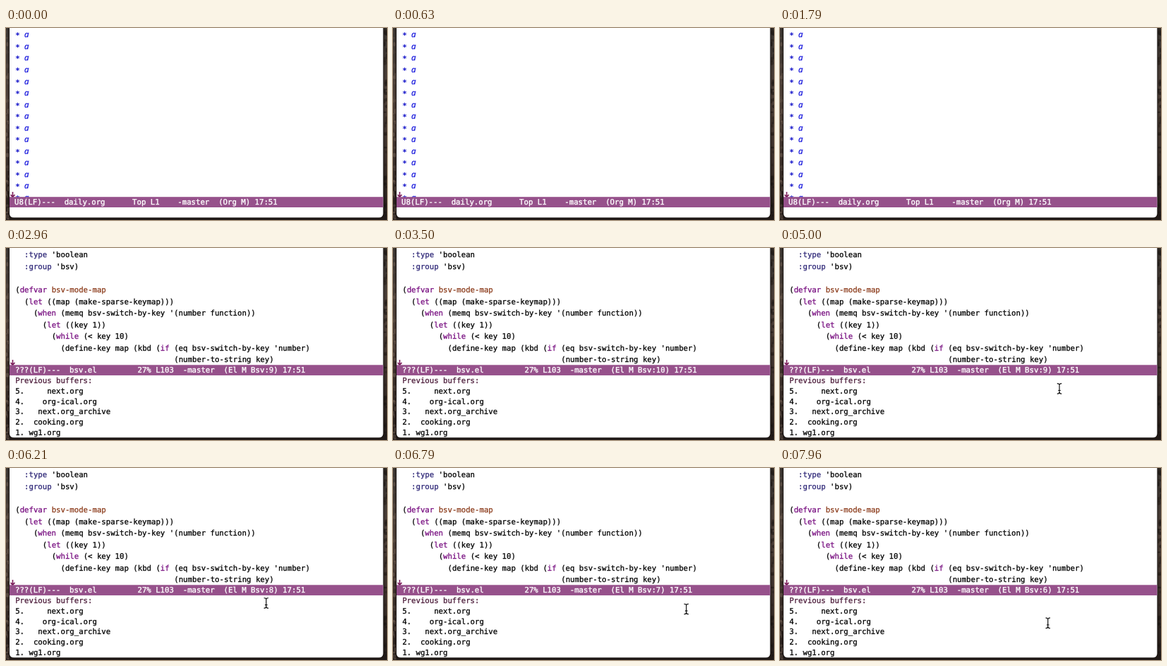
An HTML page that plays this animation: 540 px wide and 273 px high, repeating every 8 s.

```html
<!DOCTYPE html>
<html lang="en">
<head>
<meta charset="utf-8">
<title>Buffer switching</title>
<style>
  html, body { margin: 0; width: 100%; height: 100%; overflow: hidden; background: #2d2521; }
  svg { display: block; width: 540px; height: 273px; }
  text {
    font: 10.68px "DejaVu Sans Mono", monospace;
    white-space: pre;
    text-rendering: geometricPrecision;
    color: #000;
  }
  text, tspan { fill: currentColor; stroke: currentColor; stroke-width: .28px; }
  .k { color: #780f80; }
  .v { color: #8c3c1c; }
  .b { color: #2f2878; }
  .prompt { color: #4c1c3a; }
  .star { font-weight: bold; color: #1010c8; stroke: none; }
  .head { font: italic 11.4px "Open Sans", "Noto Sans", sans-serif; color: #1414dc; }
  .bar { fill: #96518b; }
  .mode { color: #fff; stroke-width: .36px; }
  .window { fill: #fff; stroke: #15100e; stroke-width: 2; paint-order: stroke; }
  .arrow { fill: none; stroke: #7a1a58; stroke-width: 1.6; }
  .beam { fill: none; stroke: #111; stroke-width: 1.2; }
</style>
</head>
<body>
<svg viewBox="0 0 540 273">
  <defs>
    <linearGradient id="soil" x2="0" y2="1">
      <stop offset="0" stop-color="#38332f"/>
      <stop offset=".35" stop-color="#4a3d35"/>
      <stop offset=".65" stop-color="#3a2e28"/>
      <stop offset="1" stop-color="#211a17"/>
    </linearGradient>
  </defs>
  <rect width="540" height="273" fill="url(#soil)"/>
  <g id="pebbles"></g>
  <path class="window" d="M5-3H534.5V263.5Q534.5 269.5 528.5 269.5H11Q5 269.5 5 263.5Z"/>
  <g id="outline"></g>
  <g id="code"></g>
  <g id="mouse">
    <path class="beam" d="M-3.2-7.3Q0-7.3 0-5V5Q0 7.3-3.2 7.3M3.2-7.3Q0-7.3 0-5V5Q0 7.3 3.2 7.3M-1.8 2.5H1.8"/>
  </g>
</svg>
<script>
const LOOP = 8000, FRAME = 1000 / 24;
const LEFT = 13.2, ADVANCE = 6.43, ROW = 16.54, TOP = 13.4;
const $ = id => document.getElementById(id);

const label = (x, y, body, cls = '') => `<text x="${x}" y="${y}" class="${cls}">${body}</text>`;
const at = (col, y, body, cls) => label(LEFT + col * ADVANCE, y, body, cls);
const arrow = y => `<path class="arrow" d="M9.5 ${y}v7M6.5 ${y + 4}l3 3.4l3-3.4"/>`;
const modeLine = (x, y, body) =>
  `<rect class="bar" x="5" y="${y}" width="529.5" height="14.8"/>` + label(x, y + 11.1, body, 'mode');
const paint = (cls, s) => `<tspan class="${cls}">${s}</tspan>`;
const key = s => paint('k', s);

function pebbles() {
  let seed = 11, out = '';
  const rnd = () => (seed = seed * 16807 % 2147483647) / 2147483647;
  const tones = ['#6b5a4e', '#1b1512', '#54463d', '#282019'];
  for (let i = 0; i < 90; i++) {
    const x = (i % 2 ? 535 : 0) + rnd() * 5;
    out += `<ellipse cx="${x}" cy="${rnd() * 273}" rx="${1 + rnd() * 2}" ry="${1 + rnd() * 3}"
      fill="${tones[i % 4]}" opacity=".6"/>`;
  }
  return out;
}

function outline() {
  let out = '';
  for (let i = 0; i < 15; i++) {
    const y = TOP + i * ROW;
    out += at(0, y + 1, '*', 'star') + label(26, y, 'a', 'head');
  }
  return out + arrow(233) +
    modeLine(12, 240.2, 'U8(LF)---  daily.org      Top L1    -master  (Org M) 17:51');
}

function code() {
  const lines = [
    [2, paint('b', ':type') + " 'boolean"],
    [2, paint('b', ':group') + " 'bsv)"],
    [0, ''],
    [0, `(${key('defvar')} ${paint('v', 'bsv-mode-map')}`],
    [2, `(${key('let')} ((map (make-sparse-keymap)))`],
    [4, `(${key('when')} (memq bsv-switch-by-key '(number function))`],
    [6, `(${key('let')} ((key 1))`],
    [8, `(${key('while')} (&lt; key 10)`],
    [10, `(define-key map (kbd (${key('if')} (eq bsv-switch-by-key 'number)`],
    [35, '(number-to-string key)']
  ];
  const buffers = ['next.org', 'org-ical.org', 'next.org_archive', 'cooking.org', 'wg1.org'];
  return lines.map(([col, body], i) => at(col, TOP + i * ROW, body)).join('') +
    arrow(159) +
    modeLine(13, 166.3, '???(LF)---  bsv.el         27% L103  -master  (El M Bsv:<tspan id="count">10</tspan>) 17:51') +
    at(0, 192, 'Previous buffers:', 'prompt') +
    buffers.map((name, i) => at(0, 206.8 + i * 14.8, `${5 - i}.${' '.repeat(5 - i)}${name}`)).join('');
}

$('pebbles').innerHTML = pebbles();
$('outline').innerHTML = outline();
$('code').innerHTML = code();

// Seconds left: [start time, value]
const counts = [[0, 10], [2750, 9], [3210, 10], [4750, 9], [5750, 8], [6750, 7], [7750, 6]];
// Pointer: [time, x, y]
const path = [
  [4205, 406, 266], [4380, 392, 222], [4535, 391, 219], [4580, 389, 215.5],
  [4750, 392, 207], [5000, 396, 200], [5670, 396, 200], [6000, 371, 193],
  [6170, 371, 193], [6210, 368.7, 192]
];

// One clockwise turn round the counter, opening out to full radius
function circle(t) {
  const p = Math.min(1, (t - 6210) / 800);
  const ease = p * p * (3 - 2 * p);
  const angle = (128 + 322 * ease) * Math.PI / 180;
  const r = 17.8 + 24.7 * Math.min(1, ease * 5);
  return [379.7 + r * Math.cos(angle), 178 + r * Math.sin(angle)];
}

function pointer(t) {
  if (t >= 6210) return circle(t);
  const i = path.findIndex(p => p[0] > t);
  const [t0, x0, y0] = path[i - 1], [t1, x1, y1] = path[i];
  const f = (t - t0) / (t1 - t0);
  return [x0 + (x1 - x0) * f, y0 + (y1 - y0) * f];
}

const show = (id, on) => $(id).setAttribute('visibility', on ? 'visible' : 'hidden');

function draw(now) {
  const t = now % LOOP;
  show('outline', t < 1830);
  show('code', t >= 1830);
  $('count').textContent = counts.filter(c => c[0] <= t).pop()[1];
  const visible = t >= 4210;
  show('mouse', visible);
  if (visible) {
    const step = Math.floor((t + 5) / FRAME) * FRAME + 2;
    const [x, y] = pointer(step);
    $('mouse').setAttribute('transform', `translate(${x} ${y})`);
  }
}

const start = performance.now();
function tick() {
  draw(performance.now() - start);
  requestAnimationFrame(tick);
}
tick();
</script>
</body>
</html>
```
